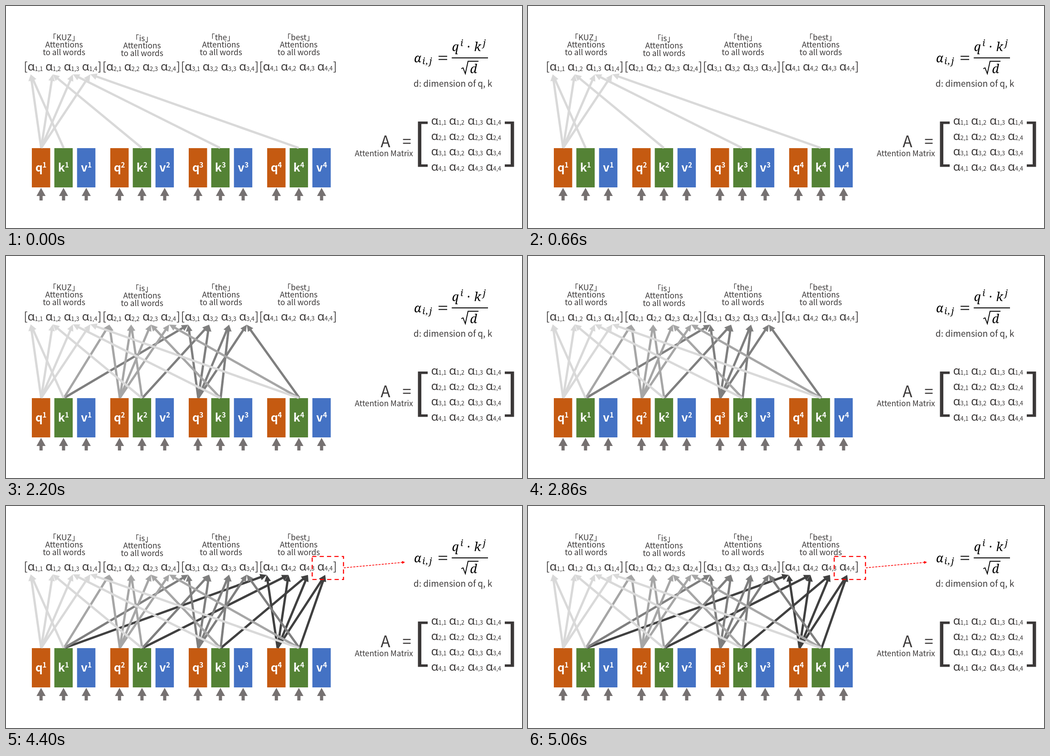
An HTML page that plays this animation: 1138x492 px, repeating every 5.5 s.

```html
<!DOCTYPE html>
<html lang="en">
<head>
<meta charset="utf-8">
<title>Attention matrix</title>
<style>
  html, body { margin: 0; width: 100%; height: 100%; overflow: hidden; background: #fff; }
  svg { display: block; width: 1138px; height: 492px; }
  text { font-family: "Noto Sans CJK JP", "Noto Sans CJK", "Noto Sans", sans-serif; font-weight: 350; fill: #3b3838; }
  .alpha { font-family: "Noto Sans", sans-serif; font-weight: 400; }
  .box { font-weight: 700; fill: #fff; }
  .math { font-family: "Noto Serif", serif; font-style: italic; font-weight: 400; fill: #000; }
</style>
</head>
<body>
<svg id="stage" viewBox="0 0 1138 492"></svg>
<script>
const stage = document.getElementById("stage");
const STEP = 1100, STEPS = 5;
const INK = "#3b3838";

function add(parent, tag, attrs, content = "") {
  const node = document.createElementNS("http://www.w3.org/2000/svg", tag);
  for (const key in attrs) node.setAttribute(key, attrs[key]);
  node.textContent = content;
  parent.append(node);
  return node;
}

const text = (content, x, y, size, anchor = "middle", cls = "") =>
  add(stage, "text", { x, y, "font-size": size, "text-anchor": anchor, class: cls }, content);

function arrow(parent, [x1, y1], [x2, y2], color, width, head, dash = "none") {
  const length = Math.hypot(x2 - x1, y2 - y1);
  const ux = (x2 - x1) / length, uy = (y2 - y1) / length;
  const bx = x2 - ux * head, by = y2 - uy * head;
  const nx = -uy * head / 2, ny = ux * head / 2;
  add(parent, "line", { x1, y1, x2: bx + ux, y2: by + uy, stroke: color, "stroke-width": width, "stroke-dasharray": dash });
  add(parent, "polygon", { points: `${x2},${y2} ${bx + nx},${by + ny} ${bx - nx},${by - ny}`, fill: color });
}

function alphaTerm(row, column, x, y, subY = y) {
  text("α", x, y, 26, "middle", "alpha");
  text(`${row},${column}`, x + 8, subY, 13, "start");
}

const words = ["KUZ", "is", "the", "best"];
const groupX = [40, 213.5, 386.5, 559];
const boxX = [57, 230, 403, 576];
const labelX = [128, 300, 474, 645.5];
const alphaOffset = [15.5, 55, 95.5, 135.5];
const boxes = [["q", "#c55a11", 0], ["k", "#548235", 49.6], ["v", "#4472c4", 99.7]];

words.forEach((word, i) => {
  const drop = i === 1 ? 1.5 : 0;
  text(`「${word}」`, labelX[i], 76 + drop, 17.3);
  text("Attentions", labelX[i], 92 + drop, 17.3);
  text("to all words", labelX[i], 109 + drop, 17.3);

  text("[", groupX[i] + 3.5, 143, 25);
  text("]", groupX[i] + 166.5, 143, 25);
  alphaOffset.forEach((dx, j) => alphaTerm(i + 1, j + 1, groupX[i] + dx, 143, i === 3 ? 143 : 144));

  boxes.forEach(([letter, fill, dx]) => {
    const x = boxX[i] + dx, mid = x + 20.3;
    add(stage, "rect", { x, y: 315, width: 40.5, height: 87, fill });
    text(letter, mid - 4.5, 367, 25, "middle", "box");
    text(i + 1, mid + 7.5, 358, 15.5, "middle", "box");
    add(stage, "path", { d: `M${mid} 403l10 18h-6.5v10h-7v-10h-6.5z`, fill: "#767171" });
  });
});

// Attention matrix
text("A", 837, 313, 35);
text("=", 884, 313, 35);
text("Attention Matrix", 833.5, 333, 17.2);
add(stage, "path", { d: "M930 256H908.5V356.5H930V351H916V261.5H930zM1100 256H1120.5V356.5H1100V351H1113V261.5H1100z", fill: INK });
for (let row = 0; row < 4; row++)
  [945.5, 985, 1026, 1066].forEach((x, j) => alphaTerm(row + 1, j + 1, x, 262.5 + row * 34.2));

// Scaled dot product formula
const math = (content, x, y, size) => text(content, x, y, size, "middle", "math");
math("α", 908, 125, 27);
math("i", 921, 129, 20.5);
math(",", 928.5, 129, 20.5);
math("j", 936.5, 129, 20.5);
math("q", 991, 100, 27);
math("i", 1005, 89, 20.5);
math("·", 1020, 100, 27);
math("k", 1040, 100, 27);
math("j", 1055, 89, 20.5);
math("d", 1031, 149, 27);
add(stage, "path", {
  d: "M954 111.5H973M954 118.5H973M983 115H1063M1004 139L1008 137L1013 150L1019 122.5H1042",
  fill: "none", stroke: "#000", "stroke-width": 1.9
});
text("d: dimension of q, k", 985.5, 179, 19);

// Arrows from queries and keys to each attention row
const queryX = [77.5, 251, 424, 599];
const keyX = [127, 299.5, 472, 645.5];
const tips = [
  [54.5, 103, 147.5, 186],
  [228, 276, 319.5, 360],
  [402, 448, 492, 531],
  [575, 623, 666, 704]
];
const shades = ["#d9d9d9", "#a6a6a6", "#7f7f7f", "#404040"];
const layers = [];
for (let i = 3; i >= 0; i--) {
  layers[i] = add(stage, "g", {});
  tips[i].forEach((x, j) => {
    const tip = [x, 151.5 + i * 0.4];
    arrow(layers[i], [queryX[i], 314.5], tip, shades[i], 5, 14.5);
    arrow(layers[i], [keyX[j] + i * 0.7, 314.5], tip, shades[i], 5, 14.5);
  });
}

layers[4] = add(stage, "g", {});
add(layers[4], "rect", {
  x: 675.3, y: 111.8, width: 69, height: 51, fill: "none",
  stroke: "#f00", "stroke-width": 2.33, "stroke-dasharray": "9.3 7"
});
arrow(layers[4], [745, 137], [880, 124.5], "#f00", 1.6, 6.5, "4.5 2.5");

function render() {
  const step = Math.floor(performance.now() / STEP) % STEPS;
  layers.forEach((layer, i) => layer.setAttribute("visibility", i <= step ? "visible" : "hidden"));
  requestAnimationFrame(render);
}
render();
</script>
</body>
</html>
```
